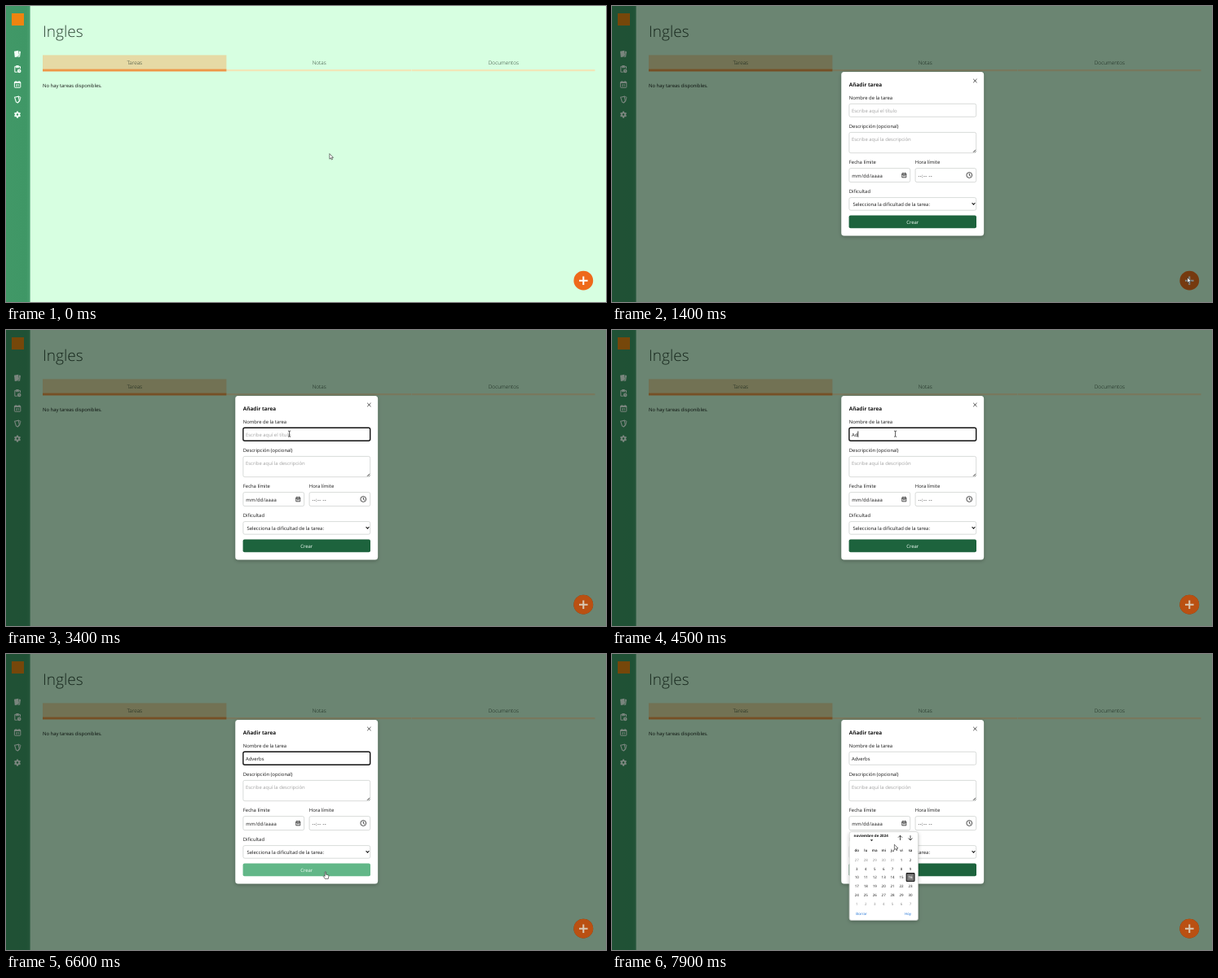
An HTML page for the animation above (8 s loop, 736x364 px).

```html
<!DOCTYPE html>
<html lang="es">
<head>
<meta charset="utf-8">
<title>Tareas</title>
<style>
  html, body { margin: 0; width: 100%; height: 100%; overflow: hidden; background: #d7ffe1; }
  svg { display: block; width: 100vw; height: 100vh; }
  text { font-family: "Open Sans", "Noto Sans", sans-serif; font-size: 5.92px; fill: #161616; text-rendering: geometricPrecision; white-space: pre; }
  .title { font-size: 19px; font-weight: 300; fill: #2b4133; }
  .tab { font-size: 6.45px; font-weight: 300; fill: #24352a; }
  .mid { text-anchor: middle; }
  .bold { font-weight: 700; font-size: 6.45px; }
  .hint { fill: #a2a2a2; }
  .field { fill: #fff; stroke: #cfd2d0; stroke-width: .8; }
  .line { fill: none; stroke: #222; stroke-width: .8; }
  .cal text { font-size: 4.45px; text-anchor: middle; }
  .cal .head { font-weight: 700; font-size: 4.5px; }
  .cal .week { font-weight: 600; }
  .cal .out { fill: #8b8b8b; }
  .cal .link { fill: #1a6fd4; }
</style>
</head>
<body>
<svg viewBox="0 0 736 364">
  <defs>
    <linearGradient id="side">
      <stop offset="0" stop-color="#419867"/>
      <stop offset=".85" stop-color="#3f9766"/>
      <stop offset="1" stop-color="#4a9f70"/>
    </linearGradient>
    <filter id="shadow" x="-20%" y="-20%" width="140%" height="140%">
      <feDropShadow dx="0" dy="1.5" stdDeviation="2" flood-opacity=".25"/>
    </filter>
  </defs>

  <rect width="736" height="364" fill="#d7ffe1"/>
  <rect width="29.6" height="364" fill="url(#side)"/>
  <rect x="7" y="9" width="15" height="15" fill="#ee8410"/>

  <g fill="#f4fff8">
    <path d="M10 55.8l5.2-1 .8 6-3 2-2.2.3zM16 55.5l2 .6-.9 6.4-3.2.4 2.4-1.8z"/>
    <path d="M17.5 77V74.4h-1.7v1.3h-3.6v-1.3h-1.4v6.8h3" fill="none" stroke="#f4fff8" stroke-width="1"/>
    <path d="M12.3 73.1h3.4v2.2h-3.4z"/>
    <circle cx="16.2" cy="79.9" r="2.3"/>
    <path d="M16.2 78.5v1.5l.9.7" fill="none" stroke="#3f9766" stroke-width=".6"/>
    <rect x="10.4" y="93.3" width="7.4" height="7" rx=".7" fill="none" stroke="#f4fff8"/>
    <path d="M10.2 93h7.8v1.9h-7.8zM11.6 92h1v1.5h-1zM15.6 92h1v1.5h-1z"/>
    <text x="14.1" y="99.4" class="mid" style="font-size:4.2px;font-weight:700;fill:#f4fff8">31</text>
    <path d="M10.6 112.2l4.6-1 1.2 5.4-2.2 2.4-1.8-1z" fill="none" stroke="#f4fff8" stroke-width="1.1"/>
    <path d="M15.3 111.2l2.7 1.1-1.4 5-1.8 1.4" fill="none" stroke="#f4fff8" stroke-width=".9"/>
    <g id="gear" transform="translate(14 133.6)">
      <circle r="2.2" fill="none" stroke="#f4fff8" stroke-width="1.9"/>
      <path d="M0-4.1V-2.5M0 4.1V2.5M3.55-2.05L2.2-1.25M-3.55 2.05L-2.2 1.25M3.55 2.05L2.2 1.25M-3.55-2.05L-2.2-1.25" stroke="#f4fff8" stroke-width="1.9"/>
    </g>
  </g>

  <text class="title" x="45" y="38.4">Ingles</text>
  <rect x="45" y="60.4" width="225.4" height="20" fill="#e6daa5"/>
  <rect x="45" y="77.6" width="225.4" height="2.8" fill="#ee9648"/>
  <path d="M271 79.1H497M497.6 79.1H722.5" stroke="#f1e6b8" stroke-width="2.3"/>
  <text class="tab mid" x="157.8" y="71.8">Tareas</text>
  <text class="tab mid" x="384.2" y="71.8">Notas</text>
  <text class="tab mid" x="610.4" y="71.8">Documentos</text>
  <text x="45" y="99.8">No hay tareas disponibles.</text>

  <g>
    <circle cx="708.3" cy="337.7" r="11.9" fill="#ee691b"/>
    <path d="M703 337.7h10.6M708.3 332.4v10.6" stroke="#fff" stroke-width="2"/>
  </g>

  <g id="modal">
    <rect width="736" height="364" fill="rgb(0,12,4)" fill-opacity=".5"/>
    <g id="add">
      <circle cx="708.3" cy="337.7" r="11.9" fill="#ba5012"/>
      <path d="M703 337.7h10.6M708.3 332.4v10.6" stroke="#d9c9b4" stroke-width="2"/>
    </g>
    <rect x="281.3" y="81" width="174.8" height="201.5" rx="3.5" fill="#fff" filter="url(#shadow)"/>
    <path d="M443.2 89.8l4.4 4.4m0-4.4l-4.4 4.4" class="line" stroke-width="1"/>
    <text class="bold" x="290.8" y="98.5">Añadir tarea</text>
    <text x="290.8" y="114.5">Nombre de la tarea</text>
    <text x="290.8" y="149.7">Descripción (opcional)</text>
    <text x="290.8" y="194">Fecha límite</text>
    <text x="371.8" y="194">Hora límite</text>
    <text x="290.8" y="229.9">Dificultad</text>

    <rect id="name" class="field" x="290.9" y="120.3" width="155.8" height="16" rx="2"/>
    <text id="hint" class="hint" x="294" y="130.6">Escribe aquí el título</text>
    <text id="typed" x="294" y="130.6"></text>
    <rect id="caret" y="124.4" width=".8" height="7.4" fill="#111"/>

    <rect class="field" x="290.9" y="155.4" width="155.8" height="25.3" rx="2"/>
    <text class="hint" x="294" y="165.6">Escribe aquí la descripción</text>
    <path d="M443 179.8l3-3M444.8 179.8l1.2-1.2" class="line" stroke-width=".5"/>

    <rect class="field" x="290.9" y="199.6" width="74.8" height="17" rx="2"/>
    <text x="294.3" y="210.7" letter-spacing=".2">mm/dd/aaaa</text>
    <path d="M355.8 206h5v4.8h-5zM355.8 207.3h5M357 204.8v1.2M359.6 204.8v1.2M357 208.8h2.6" class="line"/>
    <rect class="field" x="372.1" y="199.6" width="74.6" height="17" rx="2"/>
    <text x="375.6" y="210.7" letter-spacing=".35">--:-- --</text>
    <circle cx="438.3" cy="208" r="3.4" class="line"/>
    <path d="M438.3 205.8v2.4l1.6 1" class="line"/>

    <rect class="field" x="290.9" y="235.6" width="155.8" height="15.6" rx="2"/>
    <text x="295.5" y="245.9">Selecciona la dificultad de la tarea:</text>
    <path d="M441.6 242.2l1.9 1.9 1.9-1.9" class="line" style="stroke-width:1.1"/>

    <rect id="create" x="290.6" y="257.5" width="156.4" height="15.7" rx="2"/>
    <text class="mid" x="368.7" y="267.9" style="fill:#f4fff8">Crear</text>

    <g id="cal" class="cal">
      <rect x="291.2" y="218.6" width="84.3" height="108.8" rx="2.5" fill="#fff" stroke="#c4c8c5" stroke-width=".6" filter="url(#shadow)"/>
      <text class="head" x="317.7" y="225.4">noviembre de 2024</text>
      <path d="M316.8 228.3h3.4l-1.7 1.9z" fill="#222"/>
      <path d="M353.5 229v-5.8m-2.5 2.5l2.5-2.5 2.5 2.5M366 223.2v5.8m-2.5-2.5l2.5 2.5 2.5-2.5" class="line"/>
      <rect x="361.2" y="269.6" width="9.8" height="9.9" rx=".8" fill="#777" stroke="#161616" stroke-width="1.1"/>
      <text class="link" x="306" y="321.2">Borrar</text>
      <text class="link" x="363" y="321.2">Hoy</text>
    </g>
  </g>

  <g id="cursor" stroke-linejoin="round">
    <path id="arrow" d="M0 0V6.6L1.5 5.2 2.5 7.4 3.6 6.9 2.6 4.8H4.6Z" fill="#fff" stroke="#222" stroke-width=".6"/>
    <path id="move" d="M0-6L1.7-3.9H.7V-.7H3.9V-1.7L6 0 3.9 1.7V.7H.7V3.9H1.7L0 6-1.7 3.9H-.7V.7H-3.9V1.7L-6 0-3.9-1.7V-.7H-.7V-3.9H-1.7Z" fill="#fff" stroke="#6b4a35" stroke-width=".5"/>
    <path id="beam" d="M-1.6-3.5H-.5L0-3.1 .5-3.5H1.6M0-3.1V3.1M-1.6 3.5H-.5L0 3.1 .5 3.5H1.6" fill="none" stroke="#222" stroke-width=".75"/>
    <path id="hand" d="M-.7 0Q0-.9 .7 0V3.2L3.3 3.8Q4.1 4 4 5L3.4 8.4H-.6L-2.6 5.4Q-2.4 4.3-.7 5.3Z" fill="#fff" stroke="#222" stroke-width=".6"/>
  </g>
</svg>
<script>
const $ = id => document.getElementById(id);
const LOOP = 8000, STEP = 100;

// time, x, y, shape
const path = [
  [0, 396.9, 181.6, 'arrow'], [100, 396.9, 181.6, 'arrow'],
  [600, 708.3, 337.7, 'move'], [1300, 708.3, 337.7, 'move'],
  [1400, 705.9, 333.8, 'arrow'], [1500, 705.9, 333.8, 'arrow'],
  [2100, 370, 144.5, 'arrow'], [2300, 348, 130, 'beam'],
  [2500, 342, 127.6, 'beam'], [3100, 342, 127.6, 'beam'],
  [3200, 347.6, 127.7, 'beam'], [6200, 347.6, 127.7, 'beam'],
  [6300, 372, 215, 'arrow'], [6400, 388.5, 276.5, 'arrow'], [6500, 388.5, 276.5, 'arrow'],
  [6600, 391.9, 268, 'hand'], [6900, 390, 264, 'hand'],
  [7000, 384, 250, 'arrow'], [7400, 358, 207.5, 'arrow'],
  [7500, 358, 207.5, 'arrow'], [7900, 346.4, 234.2, 'arrow'], [8000, 346.4, 234.2, 'arrow']
];
const typing = [[0, ''], [4000, 'A'], [4400, 'Ad'], [5000, 'Adv'], [5400, 'Adver'], [5600, 'Adverb'], [5800, 'Adverbs']];
const blinks = [[2800, 3400], [3900, 6300], [6800, 7300]];

const within = (t, a, b) => t >= a && t < b;
const show = (id, on) => { $(id).style.display = on ? '' : 'none'; };
const last = (rows, t) => rows.reduce((hit, row) => row[0] <= t ? row : hit);

function addText(x, y, value, cls) {
  const el = document.createElementNS('http://www.w3.org/2000/svg', 'text');
  el.setAttribute('x', x);
  el.setAttribute('y', y);
  el.setAttribute('class', cls);
  el.textContent = value;
  $('cal').append(el);
  return el;
}

function buildCalendar() {
  const colX = i => 300.3 + 10.95 * i;
  ['do', 'lu', 'ma', 'mi', 'ju', 'vi', 'sa'].forEach((d, i) => addText(colX(i), 242.9, d, 'week'));
  for (let i = 0; i < 42; i++) {
    const day = i - 4;
    const inside = day >= 1 && day <= 30;
    const label = day < 1 ? day + 31 : day > 30 ? day - 30 : day;
    const el = addText(colX(i % 7), 254.7 + 10.88 * Math.floor(i / 7), label, inside ? '' : 'out');
    if (day === 16) el.style.cssText = 'fill:#fff;font-weight:600';
  }
}

function drawCursor(t) {
  const a = last(path, t);
  const b = path[Math.min(path.indexOf(a) + 1, path.length - 1)];
  let k = b === a ? 0 : (t - a[0]) / (b[0] - a[0]);
  k = k * k * (3 - 2 * k);
  const x = a[1] + (b[1] - a[1]) * k, y = a[2] + (b[2] - a[2]) * k;
  $('cursor').setAttribute('transform', `translate(${x} ${y})`);
  for (const shape of ['arrow', 'move', 'beam', 'hand']) show(shape, shape === a[3]);
}

function draw(time) {
  const t = Math.floor(time / STEP) * STEP;
  const text = last(typing, t)[1];
  const focus = within(t, 2800, 7500);
  show('modal', t >= 1400);
  show('add', t >= 1500);
  show('hint', !text);
  show('cal', t >= 7500);
  if ($('typed').textContent !== text) $('typed').textContent = text;
  $('name').style.stroke = focus ? '#111' : '';
  $('name').style.strokeWidth = focus ? 1.4 : '';
  $('create').setAttribute('fill', within(t, 6600, 7000) ? '#62b788' : '#1d633d');
  show('caret', blinks.some(([a, b]) => within(t, a, b)));
  $('caret').setAttribute('x', 294.1 + (text ? $('typed').getComputedTextLength() : 0));
  drawCursor(t);
}

buildCalendar();
const start = performance.now();
(function frame() {
  draw((performance.now() - start) % LOOP);
  requestAnimationFrame(frame);
})();
</script>
</body>
</html>
```
